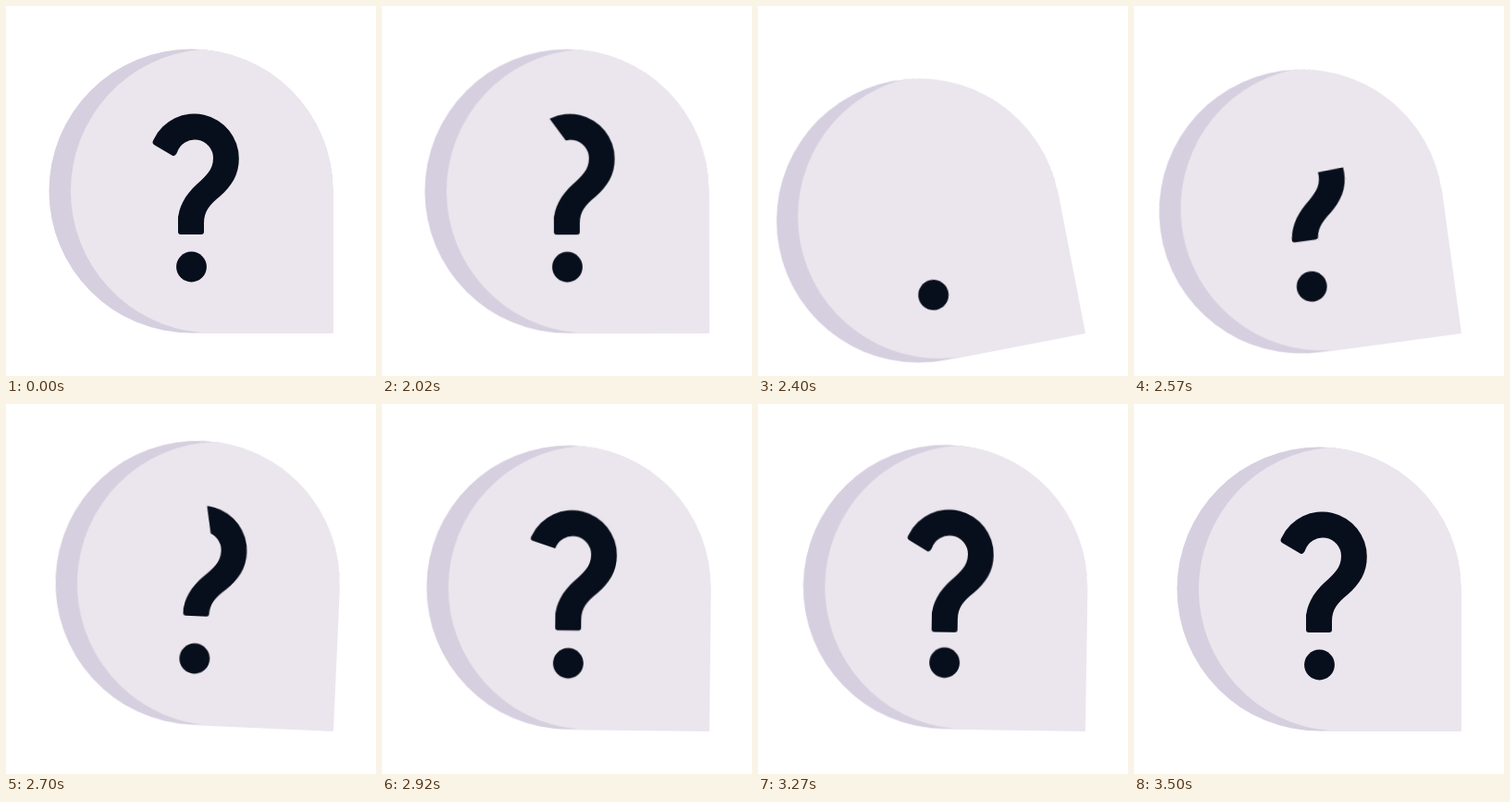
Write an HTML page that moves like this. It is 400 by 400 pixels and loops after 3.52 s.

```html
<!DOCTYPE html>
<html lang="en">
<head>
<meta charset="utf-8">
<title>Question bubble</title>
<style>
  html, body { margin: 0; width: 100%; height: 100%; overflow: hidden; background: #fff; }
  svg { display: block; width: 100vw; height: 100vh; }

  .bubble {
    transform-origin: 353.5px 353.5px;
    animation: swing 3520ms cubic-bezier(.333, 0, .667, 1) infinite;
  }
  .reveal {
    fill: none;
    stroke: #fff;
    stroke-width: 64;
    stroke-dasharray: 300 600;
    animation: trim 3520ms linear infinite;
  }
  .stem { animation: stretch 3520ms cubic-bezier(.333, 0, .667, 1) infinite; }

  /* Damped swing around the pointed corner */
  @keyframes swing {
    0%, 56.82% { transform: rotate(0deg); }
    68.47%, 70.74% { transform: rotate(-11deg); }
    78.69% { transform: rotate(5deg); }
    86.79% { transform: rotate(-3deg); }
    93.61% { transform: rotate(1deg); }
    99.43%, 100% { transform: rotate(0deg); }
  }

  /* The mark retracts from its hook to the stem, then grows back */
  @keyframes trim {
    0% { stroke-dashoffset: 0px; }
    56.68% { stroke-dashoffset: 0px; animation-timing-function: cubic-bezier(.333, .8, .667, 1); }
    67.9% { stroke-dashoffset: -235px; animation-timing-function: cubic-bezier(.333, 1, .667, 1); }
    90.8%, 100% { stroke-dashoffset: 0px; }
  }

  /* The stem comes back short and overshoots; it shrinks while hidden */
  @keyframes stretch {
    0%, 65% { height: 21px; }
    67.9%, 71.88% { height: 6px; }
    88.07% { height: 25px; }
    98%, 100% { height: 21px; }
  }
</style>
</head>
<body>
<svg viewBox="0 0 400 400">
  <defs>
    <mask id="sweep" maskUnits="userSpaceOnUse" x="100" y="80" width="220" height="200">
      <path class="reveal" d="M174 164A42 42 0 0 1 216 126C234 126 245 145 243 168C240 196 200 205 200 236V262"/>
    </mask>
  </defs>
  <g class="bubble">
    <path fill="#d6cfdf" d="M353.5 353.5H200A153.5 153.5 0 1 1 353.5 200Z"/>
    <path fill="#ebe6ed" d="M353.5 353.5H211.75V353.05A153.5 153.5 0 0 1 211.75 46.95A153.5 153.5 0 0 1 353.5 200Z"/>
    <g fill="#080f1c">
      <g mask="url(#sweep)">
        <path d="M160 143.8A48.3 48.3 0 0 1 251.8 164.8C252 182 244 195 231 206C220 215 214 222 214 235V231H186C186.500 218 193 205 206 193C216 184 224 177 224 164.5A20 20 0 0 0 185 158.300Q182.500 163.500 179.500 161.500L160 150Q157 148 160 143.800Z"/>
        <rect class="stem" x="186" y="226" width="28" height="21" rx="3"/>
      </g>
      <circle cx="200.500" cy="282" r="16.400"/>
    </g>
  </g>
</svg>
</body>
</html>
```
